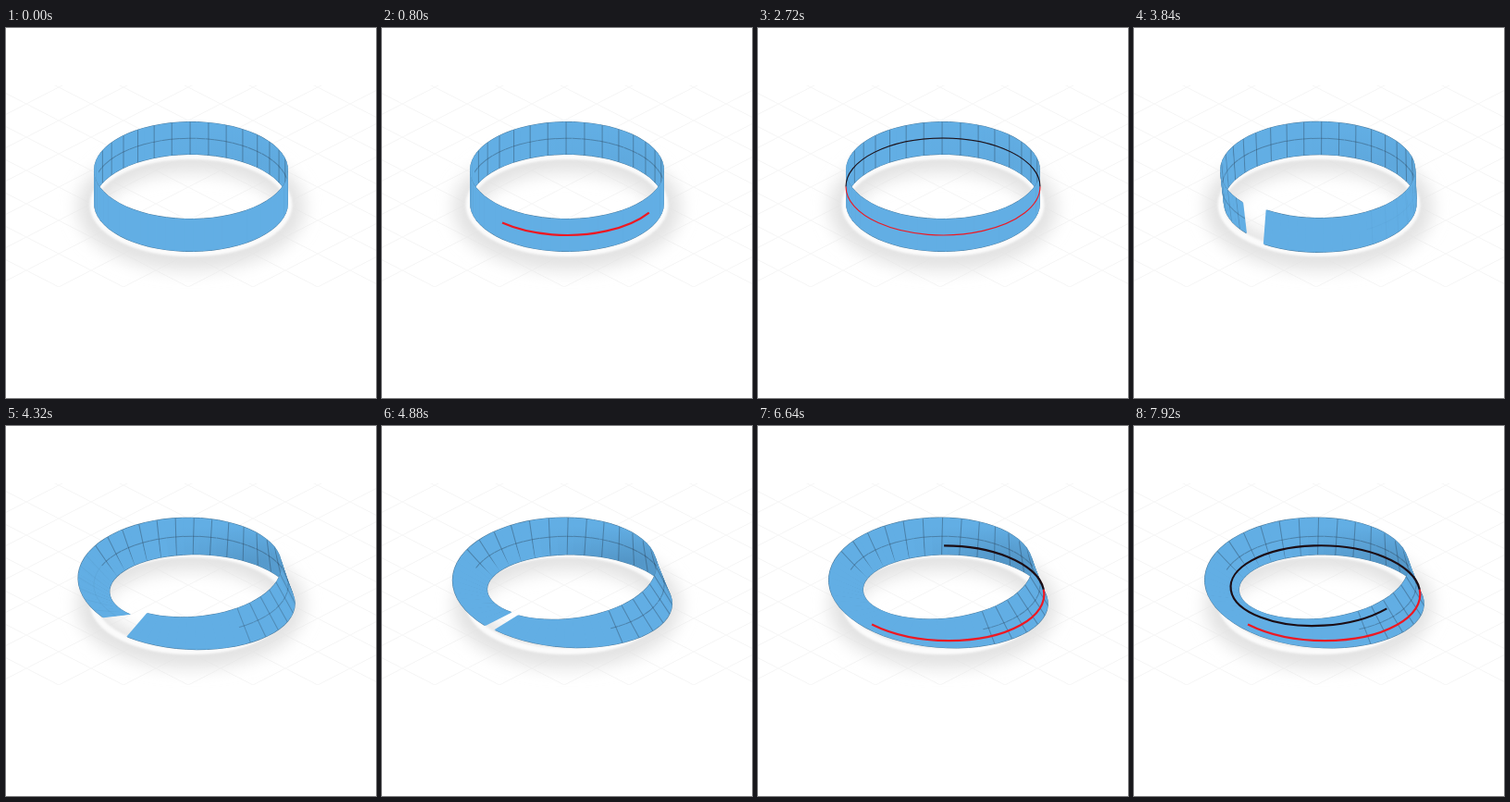
An HTML page without scripts for the animation above (8 s loop, 400 by 400 pixels).

```html
<!DOCTYPE html>
<html lang="en">
<head>
<meta charset="utf-8">
<title>Band to Moebius strip</title>
<style>
@property --phase { syntax: "<number>"; inherits: true; initial-value: 0 }
@property --twist { syntax: "<number>"; inherits: true; initial-value: 0 }
@property --gap { syntax: "<number>"; inherits: true; initial-value: 0 }
@property --a0 { syntax: "<angle>"; inherits: true; initial-value: 0deg }
@property --a1 { syntax: "<angle>"; inherits: true; initial-value: 0deg }
@property --f0 { syntax: "<angle>"; inherits: true; initial-value: 0deg }
@property --f1 { syntax: "<angle>"; inherits: true; initial-value: 0deg }
@property --x0 { syntax: "<number>"; inherits: true; initial-value: 0 }
@property --x1 { syntax: "<number>"; inherits: true; initial-value: 0 }
@property --y0 { syntax: "<number>"; inherits: true; initial-value: 0 }
@property --y1 { syntax: "<number>"; inherits: true; initial-value: 0 }
@property --u0 { syntax: "<number>"; inherits: true; initial-value: 0 }
@property --u1 { syntax: "<number>"; inherits: true; initial-value: 0 }
@property --v0 { syntax: "<number>"; inherits: true; initial-value: 0 }
@property --v1 { syntax: "<number>"; inherits: true; initial-value: 0 }

html, body { margin: 0; width: 100%; height: 100%; overflow: hidden; background: #fff }
svg, .strip { position: absolute; left: 0; top: 0; width: 400px; height: 400px; will-change: transform }

/* Cutting and twisting */
.strip {
  isolation: isolate;
  --twist: calc(.5 - .5*cos(180deg*var(--phase)));
  animation: twist 8s infinite, gap 8s infinite;
}
@keyframes twist {
  0%, 45.95% { --phase: 0; animation-timing-function: steps(11) }
  56.95%, 100% { --phase: 1 }
}
@keyframes gap {
  0%, 43.95% { --gap: 0; animation-timing-function: steps(4) }
  47.95%, 56.95% { --gap: 8.4; animation-timing-function: steps(7) }
  63.95%, 100% { --gap: 0 }
}

/* 11 groups of 6 slices; --k is the slice index */
p { display: contents; --r: 0 }
p:nth-child(n+3) { --r: calc(.4*var(--twist)) }
p:nth-child(n+5) { --r: .42 }
p:nth-child(n+10) { --r: calc(.04*var(--gap)*(1 - var(--twist))) }
i { --n: 0; --k: calc(6*var(--t) + var(--n)) }
i:nth-child(2) { --n: 1 }
i:nth-child(3) { --n: 2 }
i:nth-child(4) { --n: 3 }
i:nth-child(5) { --n: 4 }
i:nth-child(6) { --n: 5 }
i { position: absolute; inset: 0; z-index: calc(200 + 99*sin(129deg - 5.4545deg*var(--k))) }
b, i::before, b::before, b::after { content: ""; position: absolute; left: 0; top: 0 }

/* Projected centre (x, y) and half-width vector (u, v) at both ends of a slice */
i, b {
  --e: 0;
  --q0: calc((var(--k) - var(--e))/66);
  --q1: calc((var(--k) + 1 + var(--e))/66);
  --a0: calc(131.8deg - 1deg*var(--gap) - var(--q0)*(360deg - 2deg*var(--gap)));
  --a1: calc(131.8deg - 1deg*var(--gap) - var(--q1)*(360deg - 2deg*var(--gap)));
  --f0: calc(var(--twist)*(var(--q0)*180deg - 90deg));
  --f1: calc(var(--twist)*(var(--q1)*180deg - 90deg));
  --x0: calc(200 + 105*cos(var(--a0)));
  --x1: calc(200 + 105*cos(var(--a1)));
  --y0: calc(171.5 + 52.5*sin(var(--a0)));
  --y1: calc(171.5 + 52.5*sin(var(--a1)));
  --u0: calc(20.8*sin(var(--f0))*cos(var(--a0)));
  --u1: calc(20.8*sin(var(--f1))*cos(var(--a1)));
  --v0: calc(10.4*sin(var(--f0))*sin(var(--a0)) - 18*cos(var(--f0)));
  --v1: calc(10.4*sin(var(--f1))*sin(var(--a1)) - 18*cos(var(--f1)));
}

/* Edge and face quads */
b, i::before {
  width: 400px; height: 400px; --h: 1; background: #4c7c9f;
  clip-path: polygon(
    calc(1px*(var(--x0) + var(--h)*var(--u0))) calc(1px*(var(--y0) + var(--h)*var(--v0))),
    calc(1px*(var(--x1) + var(--h)*var(--u1))) calc(1px*(var(--y1) + var(--h)*var(--v1))),
    calc(1px*(var(--x1) - var(--h)*var(--u1))) calc(1px*(var(--y1) - var(--h)*var(--v1))),
    calc(1px*(var(--x0) - var(--h)*var(--u0))) calc(1px*(var(--y0) - var(--h)*var(--v0))));
}
b {
  --e: .12; --h: .972;
  --shade: calc((.1 + .4*var(--twist))*(cos(var(--a0) + 45deg) - .5));
  background: linear-gradient(#0000 108px, rgb(40 80 115 / var(--shade)) 145px) #62aee4;
}

/* Grid: cross ribs and middle line, from (px, py) along (lx, ly) */
b::before, b::after {
  width: calc(1px*hypot(var(--lx), var(--ly)));
  height: .7px;
  transform-origin: 0 50%;
  transform: translate(calc(1px*(var(--px))), calc(1px*(var(--py)))) rotate(atan2(var(--ly), var(--lx)));
  background: rgb(44 67 88 / var(--r));
}
b::before {
  --px: var(--x0) + .72*(var(--x1) - var(--x0)) - var(--u0);
  --py: var(--y0) + .72*(var(--y1) - var(--y0)) - var(--v0);
  --lx: 2*var(--u0);
  --ly: 2*var(--v0);
}
b::after {
  --px: var(--x0);
  --py: var(--y0);
  --lx: var(--x1) - var(--x0);
  --ly: var(--y1) - var(--y0);
}
p:nth-child(-n+2) b::before, p:nth-child(-n+2) b::after, i:nth-child(even) b::before { display: none }

/* Drawn lines */
.line { fill: none; stroke: #ee1822; stroke-width: 2.2; stroke-dasharray: 0 999 }
.dark { stroke: #1c0d14 }
.loop { animation: thin 8s linear infinite }
.loop path { stroke-width: inherit }
.l1 { animation: l1 8s linear infinite }
.l2 { animation: l2 8s linear infinite }
.l3 { animation: l3 8s linear infinite }
.m1 { animation: m1 8s linear infinite }
.m2 { animation: m2 8s linear infinite }
@keyframes thin {
  0%, 28.5% { stroke-width: 2.2px }
  34% { stroke-width: 1.1px }
  39%, 100% { stroke-width: 0px }
}
@keyframes l1 {
  0%, 3.08% { stroke-dasharray: 0 999 }
  5.98% { stroke-dasharray: 71.7 999 }
  8.06% { stroke-dasharray: 124.8 999 }
  10.15% { stroke-dasharray: 168.1 999 }
  12.23%, 100% { stroke-dasharray: 210 999 }
}
@keyframes l2 {
  0%, 12.23% { stroke-dasharray: 0 999 }
  14.31% { stroke-dasharray: 30.7 999 }
  16.4% { stroke-dasharray: 74 999 }
  20.56% { stroke-dasharray: 180.2 999 }
  22.65% { stroke-dasharray: 223.5 999 }
  24.73%, 100% { stroke-dasharray: 260 999 }
}
@keyframes l3 {
  0%, 24.73% { stroke-dasharray: 0 999 }
  26.81% { stroke-dasharray: 30.7 999 }
  28.08%, 100% { stroke-dasharray: 60 999 }
}
@keyframes m1 {
  0%, 67.64% { stroke-dasharray: 0 999 }
  70.76% { stroke-dasharray: 86.5 999 }
  73.89% { stroke-dasharray: 167 999 }
  77.01%, 100% { stroke-dasharray: 218 999 }
}
@keyframes m2 {
  0%, 77.01% { stroke-dasharray: 0 999 }
  80.14% { stroke-dasharray: 53.5 999 }
  83.26% { stroke-dasharray: 131 999 }
  86.39% { stroke-dasharray: 201 999 }
  89.51% { stroke-dasharray: 241 999 }
  92.64% { stroke-dasharray: 285.5 999 }
  95.76% { stroke-dasharray: 355.5 999 }
  98.89% { stroke-dasharray: 426.5 999 }
  100% { stroke-dasharray: 445 999 }
}
</style>
</head>
<body>
<svg viewBox="0 0 400 400">
  <defs>
    <pattern id="floor" width="70" height="36" patternUnits="userSpaceOnUse" x="22" y="10">
      <path d="M0 0L70 36M0 36L70 0" stroke="#f4f4f4" stroke-width=".9"/>
    </pattern>
    <filter id="soft" x="-30%" y="-40%" width="160%" height="180%"><feGaussianBlur stdDeviation="9"/></filter>
    <filter id="glow"><feGaussianBlur stdDeviation=".8"/></filter>
  </defs>
  <rect y="62" width="400" height="218" fill="url(#floor)"/>
  <g fill="none">
    <ellipse cx="200" cy="194" rx="108" ry="53" stroke="#e2e2e2" stroke-width="30" filter="url(#soft)"/>
    <ellipse cx="200" cy="191" rx="106" ry="52.5" stroke="#fff" stroke-width="7" opacity=".85" filter="url(#glow)"/>
  </g>
</svg>
<div class="strip">
<p style="--t:0"><i><b></b></i><i><b></b></i><i><b></b></i><i><b></b></i><i><b></b></i><i><b></b></i></p>
<p style="--t:1"><i><b></b></i><i><b></b></i><i><b></b></i><i><b></b></i><i><b></b></i><i><b></b></i></p>
<p style="--t:2"><i><b></b></i><i><b></b></i><i><b></b></i><i><b></b></i><i><b></b></i><i><b></b></i></p>
<p style="--t:3"><i><b></b></i><i><b></b></i><i><b></b></i><i><b></b></i><i><b></b></i><i><b></b></i></p>
<p style="--t:4"><i><b></b></i><i><b></b></i><i><b></b></i><i><b></b></i><i><b></b></i><i><b></b></i></p>
<p style="--t:5"><i><b></b></i><i><b></b></i><i><b></b></i><i><b></b></i><i><b></b></i><i><b></b></i></p>
<p style="--t:6"><i><b></b></i><i><b></b></i><i><b></b></i><i><b></b></i><i><b></b></i><i><b></b></i></p>
<p style="--t:7"><i><b></b></i><i><b></b></i><i><b></b></i><i><b></b></i><i><b></b></i><i><b></b></i></p>
<p style="--t:8"><i><b></b></i><i><b></b></i><i><b></b></i><i><b></b></i><i><b></b></i><i><b></b></i></p>
<p style="--t:9"><i><b></b></i><i><b></b></i><i><b></b></i><i><b></b></i><i><b></b></i><i><b></b></i></p>
<p style="--t:10"><i><b></b></i><i><b></b></i><i><b></b></i><i><b></b></i><i><b></b></i><i><b></b></i></p>
</div>
<svg class="line" viewBox="0 0 400 400">
  <g class="loop">
    <path class="l2 dark" d="M305 171.5A105 52.5 0 0 0 95 171.5"/>
    <path class="l1" d="M130 210.6A105 52.5 0 0 0 305 171.5"/>
    <path class="l3" d="M95 171.5A105 52.5 0 0 0 130 210.6"/>
  </g>
  <path class="m2 dark" d="M308.8 176.8C305.9 162.9 291.7 150.2 270 141.4S221.1 128.5 194.4 129.4S143.7 136.3 127.2 145.4S102.9 166.1 104.8 177.6S118.2 199.6 136.9 206.8S180 217.2 205.3 215.7S254.8 207.8 272.8 197.6C279.9 193.6 283.7 190.8 288.7 186"/>
  <path class="m1" d="M123.1 214.5C145.9 225.9 176.1 232.1 206.4 232.1S264.7 225.9 283.8 215.3S311.7 190.7 308.8 176.8"/>
</svg>
</body>
</html>
```
